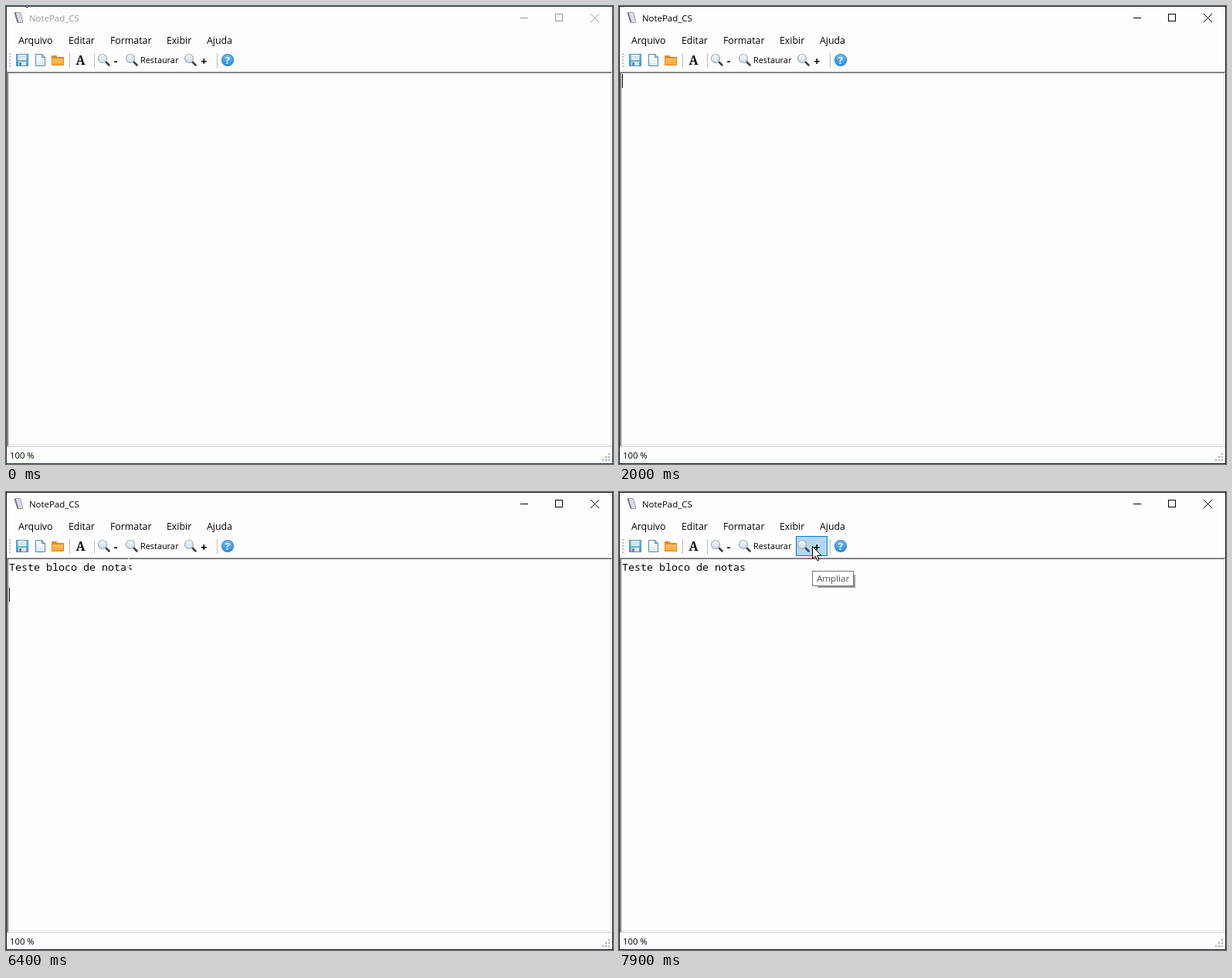
These frames come from a looping animation (786 by 593 pixels, 8000 ms). An HTML page with a canvas:

```html
<!DOCTYPE html>
<html lang="pt">
<head>
<meta charset="utf-8">
<title>NotePad_CS</title>
<style>
html, body { margin: 0; width: 100%; height: 100%; overflow: hidden; background: #fdfdfd; }
canvas { display: block; }
</style>
</head>
<body>
<canvas id="stage" width="786" height="593"></canvas>
<script>
const ctx = document.getElementById('stage').getContext('2d');
const W = 786, H = 593, LOOP = 8000, STEP = 100;
const ACTIVATE = 1950, BLINK = 530, CHAR_W = 8, ROW_H = 18, EDITOR_TOP = 86;
const MONO = '13.333px "Noto Sans Mono", "DejaVu Sans Mono", monospace';

// Pointer waypoints: time, x, y
const POINTER = [
  [0, 20, -17], [500, 14, 69], [1200, 102, 70], [1400, 102, 70], [1800, 130, 180],
  [6200, 190, 150], [6400, 158, 94], [6600, 144, 78], [6800, 130, 73],
  [7200, 130, 73], [7300, 177, 66], [7700, 250, 70]
];
// Typing bursts: text, time of the first and the last key
const BURSTS = [
  ['Te', 2900, 3000], ['ste', 3300, 3400], [' ', 3600, 3600], ['bl', 4100, 4100],
  ['oc', 4300, 4300], ['o de ', 4500, 4800], ['notas', 5100, 5500],
  ['\n', 5800, 5800], ['\n', 6100, 6100]
];

const sans = (size, weight = '') => `${weight} ${size}px "Open Sans", "Noto Sans", sans-serif`;
const clamp = v => Math.max(0, Math.min(1, v));

function pointerAt(t) {
  const next = POINTER.findIndex(p => p[0] > t);
  if (next < 0) return POINTER.at(-1).slice(1);
  const [t0, x0, y0] = POINTER[next - 1], [t1, x1, y1] = POINTER[next];
  const k = (t - t0) / (t1 - t0);
  return [Math.round(x0 + (x1 - x0) * k), Math.round(y0 + (y1 - y0) * k)];
}

function typedAt(t) {
  let str = '', lastKey = ACTIVATE;
  for (const [chunk, from, to] of BURSTS) {
    if (t < from) break;
    const share = clamp((t - from + STEP) / (to - from + STEP));
    str += chunk.slice(0, Math.ceil(chunk.length * share));
    lastKey = Math.min(t, to);
  }
  return { rows: str.split('\n'), lastKey };
}

function rect(x, y, w, h, color) {
  ctx.fillStyle = color;
  ctx.fillRect(x, y, w, h);
}

function frame(x, y, w, h, color) {
  ctx.strokeStyle = color;
  ctx.lineWidth = 1;
  ctx.strokeRect(x + .5, y + .5, w - 1, h - 1);
}

function poly(points, fill, stroke) {
  ctx.beginPath();
  points.forEach(([x, y]) => ctx.lineTo(x, y));
  ctx.closePath();
  ctx.fillStyle = fill;
  ctx.fill();
  if (!stroke) return;
  ctx.strokeStyle = stroke;
  ctx.lineWidth = 1;
  ctx.stroke();
}

function line(x0, y0, x1, y1, color, width = 1) {
  ctx.strokeStyle = color;
  ctx.lineWidth = width;
  ctx.beginPath();
  ctx.moveTo(x0, y0);
  ctx.lineTo(x1, y1);
  ctx.stroke();
}

function disc(x, y, r, fill, stroke) {
  ctx.beginPath();
  ctx.arc(x, y, r, 0, 2 * Math.PI);
  ctx.fillStyle = fill;
  ctx.fill();
  ctx.strokeStyle = stroke;
  ctx.lineWidth = 1.2;
  ctx.stroke();
}

function text(str, x, y, font, color = '#000') {
  ctx.font = font;
  ctx.fillStyle = color;
  ctx.fillText(str, x, y);
}

// Vertical gradient over the icon row
function shade(top, bottom) {
  const g = ctx.createLinearGradient(0, 62, 0, 78);
  g.addColorStop(0, top);
  g.addColorStop(1, bottom);
  return g;
}

function titleBar(active) {
  const ink = active ? '#000' : '#999';
  poly([[11.5, 8.5], [18.5, 8.5], [22, 21.5], [15.5, 21.5]], '#dcdce8', '#9a9aaa');
  line(11.5, 8.5, 15.5, 21.5, '#77778a', 2);
  text('NotePad_CS', 30, 20, sans(11.45), ink);
  rect(666, 15, 10, 1, ink);
  frame(711, 10, 10, 10, ink);
  line(757, 10, 768, 21, ink);
  line(768, 10, 757, 21, ink);
}

function menu() {
  let x = 16;
  for (const label of ['Arquivo', 'Editar', 'Formatar', 'Exibir', 'Ajuda']) {
    text(label, x, 49, sans(12.35));
    x += Math.round(ctx.measureText(label).width) + 20;
  }
}

function saveIcon() {
  rect(13, 62, 16, 16, shade('#86c8ea', '#4a9bcd'));
  frame(13, 62, 16, 16, '#4b93bf');
  rect(16, 63, 10, 7, '#eff7fb');
  for (const y of [65, 67]) rect(17, y, 8, 1, '#b4cfde');
  rect(16, 72, 10, 5, '#dfe8ee');
  rect(17, 73, 3, 4, '#5a8cab');
}

function pageIcon() {
  poly([[38.5, 62.5], [46.5, 62.5], [50.5, 66.5], [50.5, 77.5], [38.5, 77.5]],
    shade('#fff', '#d6ecf9'), '#5a87a5');
  poly([[46.5, 62.5], [46.5, 66.5], [50.5, 66.5]], '#b6d9ee', '#5a87a5');
}

function folderIcon() {
  rect(59, 64, 7, 3, '#e08a1e');
  rect(59, 66, 16, 11, '#e08a1e');
  rect(60, 68, 14, 8, shade('#ffd285', '#fba12b'));
}

function fontIcon() {
  text('A', 90.5, 76, '900 16px "Noto Serif", "Liberation Serif", serif');
}

function lens(x) {
  ctx.lineCap = 'round';
  line(x + 10.5, 72.5, x + 14.5, 76.5, '#444', 2.6);
  ctx.lineCap = 'butt';
  disc(x + 6, 68, 5.5, shade('#f8fcff', '#b4d2e8'), '#a3a9ae');
}

function helpIcon() {
  disc(287, 70, 7.5, shade('#6cc0f6', '#2a8bdc'), '#3a82bd');
  text('?', 283.8, 75, sans(13, 'bold'), '#fff');
}

const BUTTONS = [
  { x: 9, w: 24, draw: saveIcon },
  { x: 33, w: 23, draw: pageIcon },
  { x: 56, w: 23, draw: folderIcon },
  { x: 85, w: 26, draw: fontIcon },
  { x: 116, w: 36, draw() { lens(119); text('-', 139.7, 76, sans(14, 'bold')); } },
  { x: 153, w: 76, draw() { lens(155); text('Restaurar', 174, 74, sans(10.9)); } },
  { x: 229, w: 41, draw() { lens(231); text('+', 252.3, 77, sans(14, 'bold')); } },
  { x: 275, w: 24, draw: helpIcon }
];

function toolbar(px, py) {
  for (let y = 61; y < 80; y += 4) rect(4, y, 2, 2, '#c0c0c0');
  for (const x of [82, 114, 273]) rect(x, 61, 1, 19, '#bdbdbd');
  for (const { x, w, draw } of BUTTONS) {
    if (px >= x && px < x + w && py >= 57 && py < 83) {
      rect(x, 57, w, 26, '#b3d7f3');
      frame(x, 57, w, 26, '#0078d7');
    }
    draw();
  }
}

function editor(t) {
  frame(1, 85, 784, 485, '#a0a0a0');
  rect(3, 569, 782, 1, '#fdfdfd');
  rect(784, 86, 1, 484, '#fdfdfd');
  frame(2, EDITOR_TOP, 782, 483, '#696969');
  rect(3, 568, 781, 1, '#e3e3e3');
  rect(783, 87, 1, 482, '#e3e3e3');

  const { rows, lastKey } = typedAt(t);
  text(rows[0], 4, 102, MONO);
  const shown = t >= ACTIVATE && Math.floor((t - lastKey) / BLINK) % 2 === 0;
  if (shown) rect(4 + rows.at(-1).length * CHAR_W, 88 + (rows.length - 1) * ROW_H, 1, ROW_H, '#000');
}

function statusBar() {
  rect(1, 570, 784, 1, '#d7d7d7');
  text('100 %', 5, 586, sans(11.3));
  for (let i = 0; i < 3; i++)
    for (let j = 2 - i; j < 3; j++) rect(772 + i * 4, 579 + j * 4, 2, 2, '#a8a8a8');
}

function tooltip(label, x, y, alpha) {
  ctx.globalAlpha = alpha;
  ctx.font = sans(11.55);
  const w = Math.round(ctx.measureText(label).width) + 12;
  rect(x + 7, y + 20, w - 5, 2, '#999');
  rect(x + w, y + 5, 2, 17, '#999');
  rect(x, y, w, 20, '#fff');
  frame(x, y, w, 20, '#767676');
  text(label, x + 6, y + 14, sans(11.55), '#505050');
  ctx.globalAlpha = 1;
}

function pointer(x, y) {
  if (y >= EDITOR_TOP) {
    rect(x, y - 9, 1, 17, '#fff');
    rect(x - 3, y + 7, 7, 1, '#fff');
    return;
  }
  ctx.save();
  ctx.translate(x + .5, y + .5);
  poly([[0, 0], [0, 16], [3.7, 12.6], [6.3, 18.3], [8.6, 17.3], [6.1, 11.8], [11.3, 11.5]], '#fff', '#000');
  ctx.restore();
}

function draw(now) {
  const t = Math.floor((now % LOOP) / STEP) * STEP;
  const active = t >= ACTIVATE;
  const [px, py] = pointerAt(t);
  rect(0, 0, W, H, '#fdfdfd');
  titleBar(active);
  menu();
  toolbar(px, py);
  editor(t);
  statusBar();
  frame(0, 0, W, H, active ? '#15212f' : '#2b3c52');
  if (t >= 7200) tooltip('Diminuir', 131, 104, clamp((7400 - t) / 280));
  if (t >= 7900) tooltip('Ampliar', 250, 102, 1);
  pointer(px, py);
}

const start = performance.now();
function tick() {
  draw(performance.now() - start);
  requestAnimationFrame(tick);
}
tick();
</script>
</body>
</html>
```
